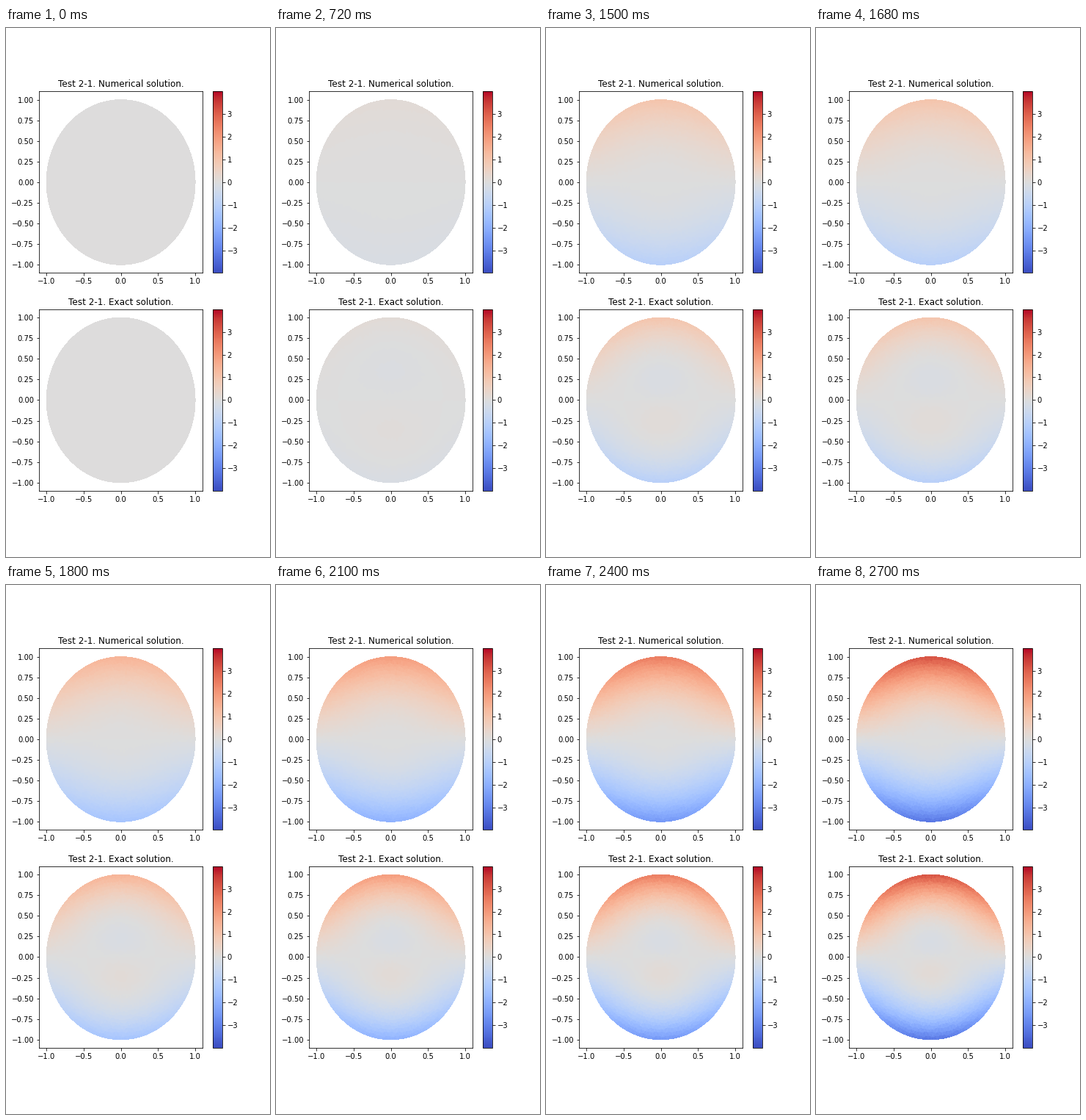
These frames come from a looping animation (360x720 px, 3 s). A matplotlib script:

```python
import numpy as np
import matplotlib.pyplot as plt
from matplotlib.animation import FuncAnimation
from matplotlib.tri import Triangulation

FRAMES = 10
RINGS = 24
VMAX = 3.99


def disk_mesh(rings, seed=2):
    """Triangulate the unit disk from rings of slightly shaken points."""
    rng = np.random.default_rng(seed)
    xs, ys = [0.0], [0.0]
    for k in range(1, rings + 1):
        n = 6 * k
        angle = 2 * np.pi * np.arange(n) / n
        radius = np.full(n, k / rings)
        if k < rings:
            angle += rng.uniform(-0.22, 0.22, n) / k
            radius += rng.uniform(-0.2, 0.2, n) / rings
        xs.extend(radius * np.cos(angle))
        ys.extend(radius * np.sin(angle))
    return Triangulation(xs, ys)


mesh = disk_mesh(RINGS)
r = np.hypot(mesh.x, mesh.y)


def numerical(t):
    return 4 * t**2 * r * mesh.y


def exact(t):
    return numerical(t) - 2 * t * (1 - r) * mesh.y


def face_values(u):
    return u[mesh.triangles].mean(axis=1)


def add_panel(ax, name):
    ax.set_title(f"Test 2-1. {name} solution.")
    surf = ax.tripcolor(mesh, facecolors=np.zeros(len(mesh.triangles)),
                        cmap="coolwarm", vmin=-VMAX, vmax=VMAX)
    ax.set(xlim=(-1.1, 1.1), ylim=(-1.1, 1.1),
           xticks=np.linspace(-1, 1, 5), yticks=np.linspace(-1, 1, 9))
    fig.colorbar(surf, ax=ax, ticks=range(-3, 4))
    return surf


plt.rcParams["font.family"] = "DejaVu Sans"
fig, axes = plt.subplots(2, 1, figsize=(5, 10), dpi=72, facecolor="white")
fig.subplots_adjust(left=0.125, right=0.9, bottom=0.125, top=0.88, hspace=0.2)

panels = [(add_panel(axes[0], "Numerical"), numerical),
          (add_panel(axes[1], "Exact"), exact)]


def update(i):
    t = i / FRAMES
    for surf, solution in panels:
        surf.set_array(face_values(solution(t)))
    return [surf for surf, _ in panels]


anim = FuncAnimation(fig, update, frames=FRAMES, interval=300,
                     repeat=True, repeat_delay=0, blit=False)
plt.show()
```
